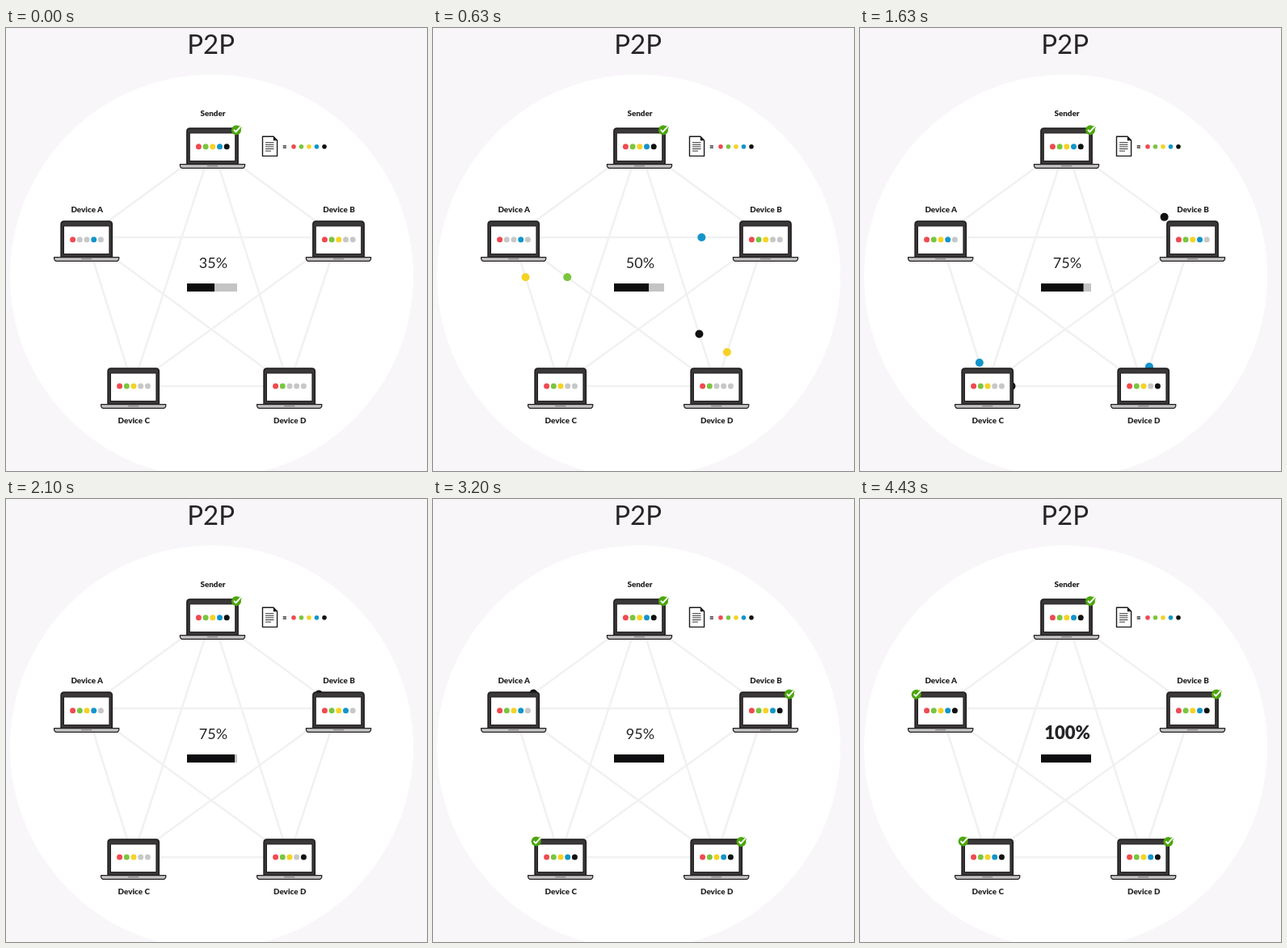
Recreate the animation shown at these times as an HTML page. Size 521 by 548 pixels, loop 4610 ms.

```html
<!DOCTYPE html>
<html lang="en">
<head>
<meta charset="utf-8">
<title>P2P</title>
<style>
  html, body { margin: 0; width: 100%; height: 100%; overflow: hidden; background: #f8f6f9; }
  svg { display: block; width: 521px; height: 548px; }
  text { font-family: Lato, sans-serif; fill: #252427; text-anchor: middle; }
  .title { font-size: 33px; font-weight: 400; }
  .label { font-size: 9.9px; font-weight: 900; }
</style>
</head>
<body>
<svg id="stage" viewBox="0 0 521 548"></svg>
<script>
const LOOP = 4610;
const COLORS = { r: '#ef4a50', g: '#7ac53f', y: '#f5d224', b: '#1295ca', k: '#111112', '.': '#c7c7c8' };
const INK = '#221f20', GREEN = '#4ca60c';

// Laptop centre, its top edge, hub of the links, label, check position and dots over time
const NODES = {
  S: { x: 255.5, top: 123.5, hub: [255, 145], label: 'Sender', labelY: 108.5, check: [285, 126.3], checkAt: -1,
       fill: [[0, 'rgybk']] },
  A: { x: 99.7, top: 238.5, hub: [99, 259], label: 'Device A', labelY: 227.5, check: [69.7, 241.7], checkAt: 3800,
       fill: [[0, 'r..b.'], [900, 'rgyb.'], [3770, 'rgybk']] },
  B: { x: 411.5, top: 238.5, hub: [411, 259], label: 'Device B', labelY: 227.5, check: [441, 241.5], checkAt: 2170,
       fill: [[0, 'rgy..'], [900, 'rgyb.'], [2130, 'rgybk']] },
  C: { x: 157.7, top: 420.5, hub: [157, 443], label: 'Device C', labelY: 489, check: [127.7, 423.6], checkAt: 2170,
       fill: [[0, 'rgy..'], [2130, 'rgybk']] },
  D: { x: 350.7, top: 420.5, hub: [350, 443], label: 'Device D', labelY: 489, check: [381.5, 424], checkAt: 2170,
       fill: [[0, 'rg...'], [900, 'rgy.k'], [2130, 'rgybk']] }
};

// Each packet: from, to, colour, start and end along the link
const PHASES = [
  { start: 0, dur: 900, hide: 900, moves: [
    ['A', 'B', 'b', .08, .92], ['C', 'A', 'y', .08, .9], ['D', 'A', 'g', .08, .9],
    ['S', 'D', 'k', .06, .97], ['B', 'D', 'y', .08, .95]] },
  { start: 828, dur: 1000, hide: 2130, moves: [
    ['A', 'C', 'b', .08, .92], ['B', 'D', 'b', .08, .95], ['D', 'C', 'k', .08, .92],
    ['S', 'B', 'k', .12, .847]] },
  { start: 2235, dur: 1000, hide: 3770, moves: [['S', 'A', 'k', .12, .84]] }
];

const PERCENT = [[0, '35%'], [50, '50%'], [940, '75%'], [2190, '95%'], [3800, '100%']];
const BAR = [[0, 34], [630, 43], [1230, 47], [2100, 59], [2300, 62], [LOOP, 62]];

const stage = document.getElementById('stage');

function el(name, attrs, parent = stage) {
  const node = document.createElementNS('http://www.w3.org/2000/svg', name);
  for (const key in attrs) node.setAttribute(key, attrs[key]);
  parent.appendChild(node);
  return node;
}
const dot = (cx, cy, r, color, parent) => el('circle', { cx, cy, r, fill: COLORS[color] }, parent);
const rect = (x, y, width, height, fill, parent) => el('rect', { x, y, width, height, fill }, parent);
const path = (d, fill, stroke, width, parent) =>
  el('path', { d, fill, stroke, 'stroke-width': width, 'stroke-linejoin': 'round' }, parent);
function text(x, y, cls, value) {
  const node = el('text', { x, y, class: cls });
  node.textContent = value;
  return node;
}

function laptop(node) {
  const g = el('g', { transform: `translate(${node.x} ${node.top})` });
  path('M-31.6 45V4.4Q-31.6 .6-27.8 .6H27.8Q31.6 .6 31.6 4.4V45Z', '#3b3839', INK, 1.6, g);
  path('M-28.3 6.5H28.3V41H-28.3Z', '#fff', INK, 1.2, g);
  path('M-40.1 45.1H40.1V46.8Q39.7 49.9 36 49.9H-36Q-39.7 49.9-40.1 46.8Z', '#c5c4c5', INK, 1.2, g);
  rect(-6.5, 46.2, 13, 1.7, '#8b898a', g);
  node.dots = [-2, -1, 0, 1, 2].map(i => dot(i * 8.7 + .3, node.top > 400 ? 22.4 : 23.2, 3.5, '.', g));
}

function check(node) {
  const g = node.mark = el('g', {});
  const tick = 'M-3.1 -.5L-.6 2.2L5.6 -4.6';
  el('circle', { r: 6, fill: GREEN }, g);
  path(tick, 'none', GREEN, 3.6, g);
  path(tick, 'none', '#fff', 1.9, g);
}

function legend() {
  path('M317.5 134.2H331L335.6 139V158.4H317.5Z', '#fff', '#1b1a1b', 1.4);
  path('M330.8 134.2V139.2H335.6Z', '#1b1a1b', 'none', 0);
  for (let i = 0; i < 5; i++) rect(321, 141.2 + i * 2.6, i === 4 ? 7 : 10.5, 1, '#333');
  rect(342.7, 145.2, 4.2, 1.3, '#252427');
  rect(342.7, 147.4, 4.2, 1.3, '#252427');
  [...'rgybk'].forEach((c, i) => dot(356 + i * 9.5, 146.8, 2.8, c));
}

function build() {
  rect(0, 0, 521, 548, '#f8f6f9');
  el('circle', { cx: 254.5, cy: 307, r: 249.5, fill: '#fff' });
  text(253.6, 32.3, 'title', 'P2P');
  for (const link of 'SA SB SC SD AB AC AD BC BD CD'.split(' ')) {
    const [from, to] = [...link].map(k => NODES[k].hub);
    path(`M${from}L${to}`, 'none', '#f1f1f1', 2.5);
  }
  for (const phase of PHASES)
    phase.dots = phase.moves.map(move => dot(0, 0, 5, move[2]));
  for (const node of Object.values(NODES)) {
    laptop(node);
    check(node);
    text(node.x + .5, node.labelY, 'label', node.label);
  }
  legend();
  rect(224, 316, 62, 10, '#c5c4c5');
}

build();
const bar = rect(224, 316, 0, 10, '#0d0d0f');
const percent = text(256.5, 297, '', '');

const current = (steps, t) => steps.filter(step => step[0] <= t).pop()[1];
const clamp = v => Math.min(1, Math.max(0, v));
const ease = u => (1 - Math.cos(Math.PI * clamp(u))) / 2;

function between(steps, t) {
  const i = steps.findIndex(step => step[0] > t);
  const [t0, v0] = steps[i - 1], [t1, v1] = steps[i];
  return v0 + (v1 - v0) * (t - t0) / (t1 - t0);
}

function draw(t) {
  for (const { start, dur, hide, moves, dots } of PHASES) {
    const k = ease((t - start) / dur);
    moves.forEach(([from, to, , a, b], i) => {
      const p = a + (b - a) * k, [x0, y0] = NODES[from].hub, [x1, y1] = NODES[to].hub;
      dots[i].setAttribute('cx', x0 + (x1 - x0) * p);
      dots[i].setAttribute('cy', y0 + (y1 - y0) * p);
      dots[i].style.display = t >= start && t < hide ? '' : 'none';
    });
  }
  for (const node of Object.values(NODES)) {
    const fill = current(node.fill, t);
    node.dots.forEach((d, i) => d.setAttribute('fill', COLORS[fill[i]]));
    const u = node.checkAt < 0 ? 1 : clamp((t - node.checkAt) / 300);
    node.mark.setAttribute('transform', `translate(${node.check}) scale(${1 - (1 - u) ** 3})`);
  }
  bar.setAttribute('width', between(BAR, t));
  const label = current(PERCENT, t), done = label === '100%';
  percent.textContent = label;
  percent.style.fontSize = done ? '22px' : '18px';
  percent.style.fontWeight = done ? 900 : 400;
}

const origin = performance.now();
function tick() {
  draw((performance.now() - origin) % LOOP);
  requestAnimationFrame(tick);
}
tick();
</script>
</body>
</html>
```
